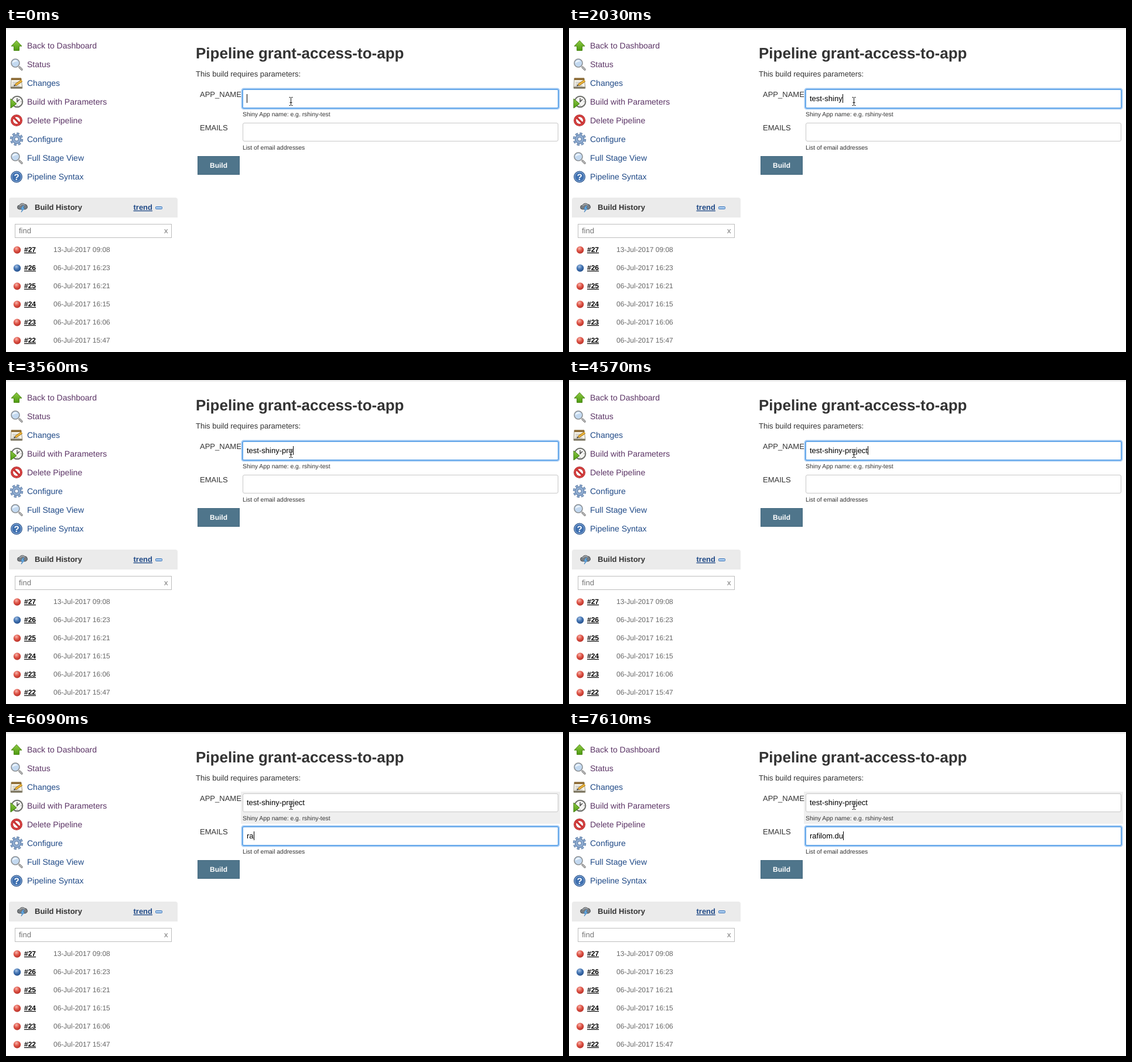
Animation, 951 px wide and 554 px high, one loop 8000 ms. Source, as an HTML page:

```html
<!DOCTYPE html>
<html lang="en">
<head>
<meta charset="utf-8">
<title>Pipeline form</title>
<style>
  html, body { margin: 0; width: 100%; height: 100%; overflow: hidden; background: #fff; }
  svg { display: block; }
  text {
    font: 13px "Liberation Sans", Arial, sans-serif;
    text-rendering: geometricPrecision;
    fill: #333;
    white-space: pre;
  }
  .bold { font-weight: bold; }
  .title { font-size: 26px; font-weight: bold; }
  .hint { font-size: 10.4px; }
  .task { font-size: 14px; fill: #204a87; }
  .visited { fill: #5c3566; }
  .link { font-weight: bold; fill: #204a87; text-decoration: underline; }
  .number { font-size: 12px; font-weight: bold; fill: #000; text-decoration: underline; }
  .date { font-size: 12px; fill: #666; }
  .typed { fill: #000; }
  .box { fill: #fff; stroke: #c8c8c8; }
  .glow { fill: none; stroke: #a9cef5; stroke-width: 1.5; }
  .ring { fill: #fff; stroke: #66a8ea; stroke-width: 2; }
</style>
</head>
<body>
<svg width="951" height="554" viewBox="0 0 951 554">
  <defs>
    <linearGradient id="leaf" x2="0" y2="1">
      <stop stop-color="#8fcb45"/><stop offset="1" stop-color="#4d9a10"/>
    </linearGradient>
    <radialGradient id="red" cx=".4" cy=".3" r=".7">
      <stop stop-color="#f7b5ab"/><stop offset=".5" stop-color="#e0584b"/><stop offset="1" stop-color="#b92e25"/>
    </radialGradient>
    <radialGradient id="blue" cx=".4" cy=".3" r=".7">
      <stop stop-color="#a9c3e4"/><stop offset=".5" stop-color="#4677b5"/><stop offset="1" stop-color="#234f8c"/>
    </radialGradient>
    <g id="lens">
      <path d="M5 5L9 9" stroke="#777" stroke-width="3.4" stroke-linecap="round"/>
      <path d="M5 5L9 9" stroke="#c9c9c9" stroke-width="1.6" stroke-linecap="round"/>
      <circle cx="-2" cy="-2" r="7" fill="#c3d9f0" stroke="#8b8f93" stroke-width="1.6"/>
      <path d="M-7-2a5 5 0 0 1 9-3q-5 0-9 3" fill="#eef5fc"/>
    </g>
    <g id="field">
      <rect class="box" x="404.5" y="105.5" width="538" height="31" rx="2.5"/>
    </g>
  </defs>

  <path d="M0 1.5H951" stroke="#d5d5d5"/>

  <path d="M18 21.5L27 31H22.5V38.5H13.5V31H9Z" fill="url(#leaf)" stroke="#48850f" stroke-linejoin="round"/>
  <use href="#lens" x="18" y="62"/>
  <g transform="translate(18 94)">
    <path d="M-9-8H8L10 9H-10Z" fill="#f4f1e6" stroke="#a09a86"/>
    <path d="M-9-8.5H8V-5H-9Z" fill="#8c6a34"/>
    <path d="M-7-1H5M-7 2H3M-8 5H5" stroke="#aaa"/>
    <path d="M-10 6.5H9.5V9.5H-10Z" fill="#77705b"/>
    <path d="M9-4L-2 3.5" stroke="#9b6c16" stroke-width="4"/>
    <path d="M9-4L-2 3.5" stroke="#f0b83b" stroke-width="2.4"/>
    <path d="M-2 3.5L-4.5 5" stroke="#333" stroke-width="1.6"/>
  </g>
  <g transform="translate(18 126)">
    <circle cx="1" r="9.3" fill="#f5f5f2" stroke="#6c6e69" stroke-width="2"/>
    <path d="M1-6V0L5-4" fill="none" stroke="#444" stroke-width="1.4"/>
    <path d="M1 6v1.5M7 0h1.5" stroke="#777"/>
    <path d="M-10-5L0 3.5L-10 11Z" fill="url(#leaf)" stroke="#3f7a0c" stroke-linejoin="round"/>
  </g>
  <g transform="translate(18 158)" fill="none">
    <circle r="8" fill="#fff" stroke="#a51d1d" stroke-width="4"/>
    <circle r="8" stroke="#d94343" stroke-width="2.6"/>
    <path d="M-5.5-5.5L5.5 5.5" stroke="#c93232" stroke-width="3.2"/>
  </g>
  <g transform="translate(18 190)">
    <circle r="9.2" fill="none" stroke="#55749e" stroke-width="4" stroke-dasharray="4.2 3.025"/>
    <circle r="7.7" fill="#8eabd0" stroke="#55749e"/>
    <circle r="9.1" fill="none" stroke="#8eabd0" stroke-width="2.6" stroke-dasharray="3.1 4.047" stroke-dashoffset="-.5"/>
    <circle r="3.2" fill="#fff" stroke="#55749e"/>
  </g>
  <use href="#lens" x="18" y="222"/>
  <circle cx="18" cy="254.500" r="9.500" fill="#3f70b0" stroke="#244c83"/>
  <circle cx="18" cy="254.500" r="8.200" fill="none" stroke="#9dbbe0"/>
  <text class="bold" x="18" y="260" text-anchor="middle" style="font-size:15px;fill:#fff">?</text>
  <g id="tasks"></g>

  <path d="M5 324V294q0-4 4-4H289q4 0 4 4V324Z" fill="#ebebeb"/>
  <path d="M23 310a3.500 3.500 0 0 1 0-7a5.500 5 0 0 1 9-1.500a4.300 4.300 0 0 1 1 8.500Z" fill="#777c80" stroke="#4d5154"/>
  <path d="M23 304q5-5 9-1" fill="none" stroke="#a9adb0" stroke-width="1.500"/>
  <path d="M29 304L25 309.500H28L26 315L32 308H29L31 304Z" fill="#6ab4ee" stroke="#2f6fae" stroke-width=".6"/>
  <text class="bold" x="49" y="311">Build History</text>
  <text class="link" x="217.500" y="311">trend</text>
  <rect x="255.500" y="305.500" width="11" height="4" rx="1" fill="#a9cbee" stroke="#3c74b8"/>
  <rect x="15.500" y="335.500" width="267" height="23" fill="#fff" stroke="#bdbdbd"/>
  <text x="22" y="351" style="fill:#757575">find</text>
  <text x="270" y="351" style="fill:#777">x</text>
  <g id="history"></g>

  <text class="title" x="324" y="52">Pipeline grant-access-to-app</text>
  <text x="324" y="83">This build requires parameters:</text>
  <rect id="shade" x="401" y="102" width="545" height="55" fill="#efefef"/>
  <text x="331" y="118">APP_NAME</text>
  <text x="331" y="175">EMAILS</text>
  <use href="#field"/>
  <use href="#field" y="57"/>
  <g id="focus">
    <rect class="glow" x="402.250" y="103.250" width="542.500" height="35.500" rx="3.500"/>
    <rect class="ring" x="404" y="105" width="539" height="32" rx="2"/>
  </g>
  <text class="hint" x="404" y="151">Shiny App name: e.g. rshiny-test</text>
  <text class="hint" x="404" y="208">List of email addresses</text>
  <text class="typed" id="app" x="411" y="125"></text>
  <text class="typed" id="emails" x="411" y="182"></text>
  <rect id="caret" y="113" width="1" height="15"/>
  <rect x="327.500" y="219.500" width="71" height="31" fill="#4f758b" stroke="#456a80"/>
  <text class="bold" x="348" y="239" style="font-size:12px;fill:#fff">Build</text>
  <g fill="none">
    <path id="beam" d="M483.500 118.500H485.500L486.500 119.500L487.500 118.500H489.500M486.500 119.500V131.500M483.500 132.500H485.500L486.500 131.500L487.500 132.500H489.500M484.500 127.500H488.500" stroke="#fff" stroke-width="2.500" opacity=".6"/>
    <use href="#beam" style="display:none"/>
    <path d="M483.500 118.500H485.500L486.500 119.500L487.500 118.500H489.500M486.500 119.500V131.500M483.500 132.500H485.500L486.500 131.500L487.500 132.500H489.500M484.500 127.500H488.500" stroke="#111"/>
  </g>
</svg>
<script>
  const $ = id => document.getElementById(id);
  const label = (cls, x, y, text) => `<text class="${cls}" x="${x}" y="${y}">${text}</text>`;

  const tasks = ["Back to Dashboard", "Status", "Changes", "Build with Parameters",
    "Delete Pipeline", "Configure", "Full Stage View", "Pipeline Syntax"];
  const visited = [0, 1, 3, 4];
  $("tasks").innerHTML = tasks.map((name, i) =>
    label(visited.includes(i) ? "task visited" : "task", 36, 35 + 32 * i, name)).join("");

  const builds = ["13-Jul-2017 09:08", "06-Jul-2017 16:23", "06-Jul-2017 16:21",
    "06-Jul-2017 16:15", "06-Jul-2017 16:06", "06-Jul-2017 15:47"];
  $("history").innerHTML = builds.map((date, i) => {
    const y = 383 + 31 * i;
    return `<circle cx="19" cy="${y - 3.5}" r="6.2" fill="url(#${i === 1 ? "blue" : "red"})"/>` +
      label("number", 31, y, "#" + (27 - i)) + label("date", 81, y, date);
  }).join("");

  const loop = 8000;
  const appName = "test-shiny-project";
  const address = "rafilom.du";
  // start time, letters in each field, caret shown
  const steps = [
    [0, 0, 0, true], [510, 0, 0, false], [1020, 4, 0, true], [1530, 6, 0, true],
    [2030, 10, 0, true], [2540, 10, 0, false], [3050, 11, 0, true], [3560, 14, 0, true],
    [4070, 15, 0, true], [4570, 18, 0, true], [5080, 18, 0, true], [5580, 18, 0, false],
    [6090, 18, 2, true], [6590, 18, 5, true], [7100, 18, 7, true], [7610, 18, 10, true]
  ];
  const switchTime = 5080;
  const begin = performance.now();
  let shown;

  function draw() {
    const time = (performance.now() - begin) % loop;
    const step = steps.findLast(s => s[0] <= time);
    if (step !== shown) {
      shown = step;
      const [start, appLetters, emailLetters, caretOn] = step;
      const second = start >= switchTime;
      $("app").textContent = appName.slice(0, appLetters);
      $("emails").textContent = address.slice(0, emailLetters);
      $("shade").style.display = second ? "" : "none";
      const shift = `translate(0 ${second ? 57 : 0})`;
      $("focus").setAttribute("transform", shift);
      $("caret").setAttribute("transform", shift);
      const active = $(second ? "emails" : "app");
      const width = active.textContent ? active.getComputedTextLength() : 0;
      $("caret").setAttribute("x", Math.round(411 + width));
      $("caret").style.display = caretOn ? "" : "none";
    }
    requestAnimationFrame(draw);
  }
  draw();
</script>
</body>
</html>
```
